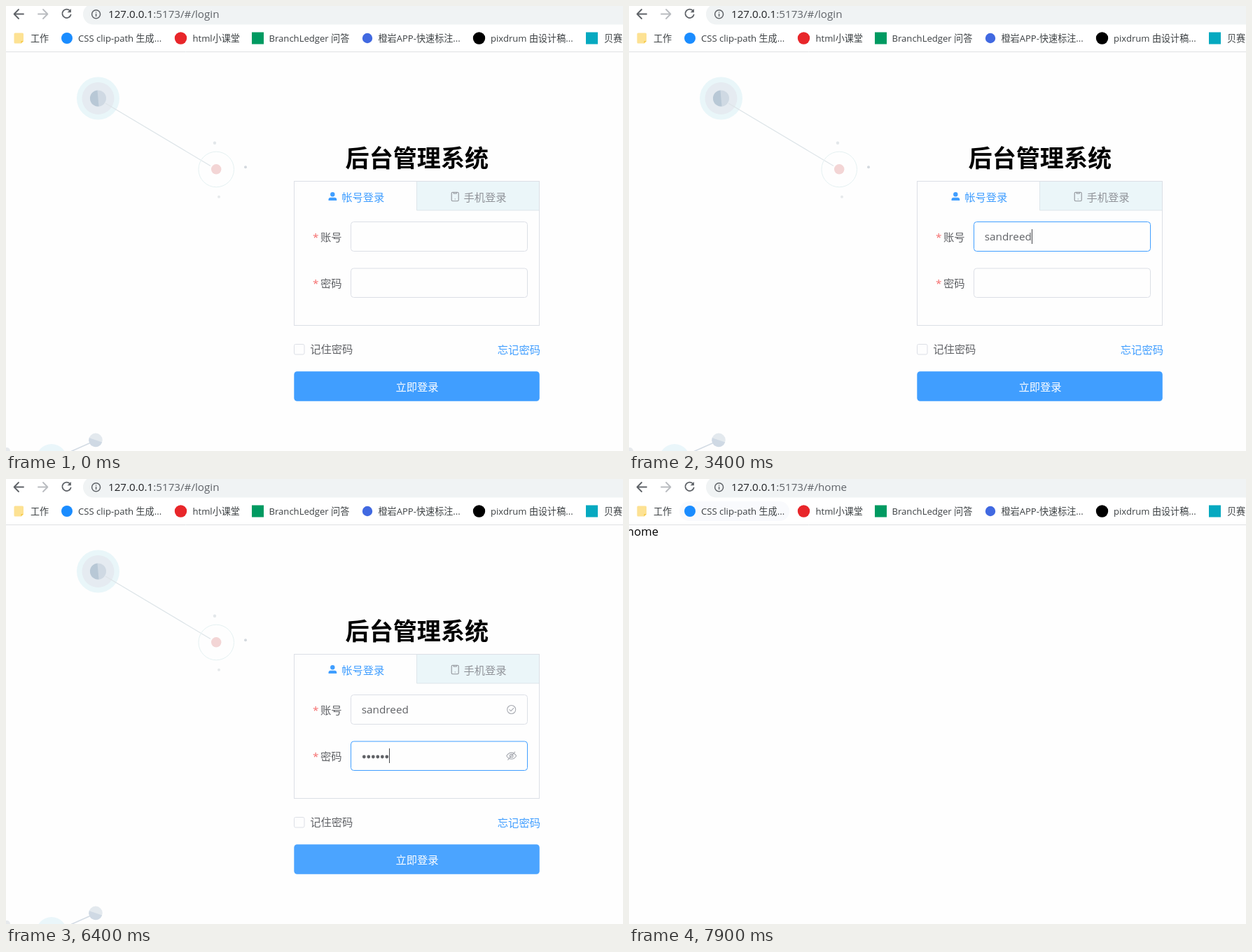
An HTML page for the animation above (8000 ms loop, 881 by 636 pixels).

```html
<!DOCTYPE html>
<html lang="zh-CN">
<head>
<meta charset="utf-8">
<title>后台管理系统</title>
<style>
html, body { margin: 0; width: 100%; height: 100%; overflow: hidden; background: #fff; }
svg { display: block; width: 881px; height: 636px; font: 15.3px "Open Sans", "Noto Sans CJK SC", "Noto Sans CJK", sans-serif; }
.line { fill: none; stroke-linecap: round; stroke-linejoin: round; }
.bookmarks { font-size: 13.1px; fill: #3c4043; }
.url { font-size: 15.2px; fill: #5f6368; }
.url .host { fill: #202124; }
.title { font-size: 34.1px; font-weight: 700; text-anchor: middle; }
.label { fill: #606266; }
.blue { fill: #409eff; }
.grey { fill: #909399; }
.star { fill: #f56c6c; }
.border { fill: none; stroke: #dcdfe6; }
.icon { fill: none; stroke: #a8abb2; stroke-width: 1.1; stroke-linecap: round; stroke-linejoin: round; }

/* One shared 8 s clock; 100 ms = 1.25% */
.login, .home, #accountBox, #passBox, #button, .ok1, .ok2, .eye { animation: 8s step-end infinite; }
.login { animation-name: login; }
.home { animation-name: home; }
#accountBox { animation-name: account; }
#passBox { animation-name: pass; }
#button { fill: #409eff; animation-name: button; }
.ok1 { animation-name: ok1; }
.ok2 { animation-name: ok2; }
.eye { animation-name: eye; }
@keyframes login { 0% { opacity: 1 } 90%, 100% { opacity: 0 } }
@keyframes home { 0% { opacity: 0 } 90%, 100% { opacity: 1 } }
@keyframes account {
  0% { stroke: #dcdfe6 } 6.25% { stroke: #c0c4cc } 8.75% { stroke: #80b1e6 }
  10% { stroke: #409eff } 57.5% { stroke: #8ebff3 } 58.75%, 100% { stroke: #dcdfe6 }
}
@keyframes pass {
  0% { stroke: #dcdfe6 } 3.75% { stroke: #c0c4cc } 6.25% { stroke: #dcdfe6 }
  52.5% { stroke: #c0c4cc } 56.25% { stroke: #b4bccf } 57.5% { stroke: #80b1e6 }
  58.75% { stroke: #409eff } 87.5%, 100% { stroke: #c8d6ea }
}
@keyframes button {
  0% { fill: #409eff } 80% { fill: #4ba4ff } 81.25% { fill: #79bbff }
  86.25% { fill: #4f96e2 } 87.5%, 100% { fill: #79bbff }
}
@keyframes ok1 { 0% { opacity: 0 } 56.25%, 100% { opacity: 1 } }
@keyframes ok2 { 0% { opacity: 0 } 86.25%, 100% { opacity: 1 } }
@keyframes eye {
  0% { opacity: 0; transform: none } 58.75% { opacity: 1; transform: none }
  86.25%, 100% { opacity: 1; transform: translateX(-23px) }
}
</style>
</head>
<body>
<svg viewBox="0 0 881 636">
  <defs>
    <g id="check" class="icon"><circle r="6"/><path d="M-2.8 .2L-.7 2.2L3-1.8"/></g>
  </defs>
  <rect width="881" height="636" fill="#fefefe"/>
  <rect width="881" height="65" fill="#fff"/>

  <!-- Browser bar -->
  <rect x="110" y="-3" width="800" height="29.5" rx="14.7" fill="#f0f3f4"/>
  <g class="line" stroke-width="1.8">
    <path d="M25 11.5H12M18 5L11.6 11.5L18 18" stroke="#5f6368"/>
    <path d="M46 11.5H59M53 5L59.4 11.5L53 18" stroke="#b9bcc0"/>
    <path d="M91.5 7A6.2 6.2 0 1 0 92.6 12.5" stroke="#5f6368"/>
    <circle cx="128.6" cy="11.8" r="6" stroke="#5f6368" stroke-width="1.5"/>
    <path d="M128.6 11.5V14.6M128.6 8.9V9" stroke="#5f6368" stroke-width="1.5"/>
  </g>
  <path d="M92.9 4V9.3H87.6Z" fill="#5f6368"/>
  <text class="url login" x="146" y="17"><tspan class="host">127.0.0.1</tspan>:5173/#/login</text>
  <text class="url home" x="146" y="17"><tspan class="host">127.0.0.1</tspan>:5173/#/home</text>

  <!-- Bookmarks -->
  <rect class="home" x="72" y="32" width="157" height="28" rx="14" fill="#f9fafd"/>
  <path d="M13 38.5H23.5Q25 38.5 25 40V50L21.5 53.5H13Q11.5 53.5 11.5 52V40Q11.5 38.5 13 38.5Z" fill="#fde293"/>
  <path d="M25 50H21.5V53.5Z" fill="#f6c945"/>
  <circle cx="87" cy="46" r="8" fill="#1a8cff"/>
  <circle cx="249.5" cy="46" r="8.7" fill="#e8262a"/>
  <rect x="351" y="37.5" width="17" height="17" fill="#009a61"/>
  <circle cx="516" cy="46" r="7.2" fill="#4169e1"/>
  <circle cx="675.5" cy="46" r="8.7" fill="#000"/>
  <rect x="828" y="37.5" width="17" height="17" fill="#06a9c0"/>
  <g class="bookmarks">
    <text x="35" y="51">工作</text>
    <text x="103" y="51">CSS clip-path 生成...</text>
    <text x="266.5" y="51">html小课堂</text>
    <text x="375.5" y="51">BranchLedger 问答</text>
    <text x="531.5" y="51">橙岩APP-快速标注...</text>
    <text x="692" y="51">pixdrum 由设计稿...</text>
    <text x="854" y="51">贝赛尔曲线</text>
  </g>
  <path d="M0 65.5H881" stroke="#dfe1e3"/>

  <g class="login">
    <!-- Backdrop -->
    <circle cx="131.5" cy="132" r="30.5" fill="#e9f6f9"/>
    <circle cx="131.5" cy="132" r="23" fill="#e5ebf1"/>
    <circle cx="131.5" cy="132" r="11.5" fill="#cfd9e3"/>
    <path d="M130.5 120.5A11.5 11.5 0 0 0 132.5 143.5Z" fill="#b8c8d6"/>
    <path d="M142 139L292 228.5" stroke="#dde4e8" stroke-width="1.2"/>
    <circle cx="300.2" cy="233.5" r="25.3" fill="none" stroke="#e4f0f1"/>
    <circle cx="300.2" cy="233.3" r="7.2" fill="#f3d5d5"/>
    <circle cx="298" cy="195.8" r="2.2" fill="#e3e7ea"/>
    <circle cx="342" cy="230.3" r="2" fill="#d3d9de"/>
    <circle cx="304" cy="272.8" r="2" fill="#e6e9eb"/>
    <circle cx="65" cy="648" r="22" fill="#eaf6fa"/>
    <path d="M93 636.5L120 624.5" stroke="#d3dbe4" stroke-width="1.5"/>
    <circle cx="128" cy="620.3" r="9.7" fill="#e3e9ee"/>
    <path d="M118.8 617.2L137.2 623.6A9.7 9.7 0 0 1 118.8 617.2Z" fill="#cfd9e4"/>
    <circle cx="1" cy="636" r="5" fill="#e6e9ec"/>

    <!-- Form card -->
    <text class="title" x="586.8" y="230">后台管理系统</text>
    <rect x="586" y="250" width="176" height="42" fill="#ebf6f9"/>
    <path d="M586.5 251V292H761.5" fill="none" stroke="#dde5ea"/>
    <rect class="border" x="411.5" y="250.5" width="350" height="206"/>
    <g class="blue">
      <circle cx="466.3" cy="269.2" r="3.2"/>
      <path d="M460.5 278V276.8Q460.5 273.8 463.5 273.8H469.2Q472.2 273.8 472.2 276.8V278Z"/>
      <text x="479.2" y="278.6">帐号登录</text>
    </g>
    <g class="line" stroke="#909399" stroke-width="1.1">
      <rect x="636.2" y="266.2" width="10" height="12.6" rx="1.6"/>
      <path d="M639.2 266.6V268H643.2V266.6M641.2 275.8V276"/>
    </g>
    <text class="grey" x="653.4" y="278.6">手机登录</text>
    <text class="star" x="438" y="335.5">*</text>
    <text class="label" x="449" y="335.6">账号</text>
    <text class="star" x="438" y="401.5">*</text>
    <text class="label" x="449" y="401.6">密码</text>
    <rect id="accountBox" class="border" x="492.5" y="308.5" width="252" height="42" rx="4"/>
    <rect id="passBox" class="border" x="492.5" y="375" width="252" height="41.5" rx="4"/>
    <text id="user" class="label" x="507.8" y="335.3"></text>
    <path id="dots" class="line" stroke="#606266" stroke-width="4.8" stroke-dasharray="0 6.5"/>
    <rect id="caret" width="1" height="21" fill="#44464a"/>
    <g class="ok1"><use href="#check" x="721.7" y="329.5"/></g>
    <g class="ok2"><use href="#check" x="721.7" y="395.5"/></g>
    <g class="eye"><g class="icon" transform="translate(721.7 395.7)">
      <path d="M-7 0Q-4-4.6 0-4.6T7 0Q4 4.6 0 4.6T-7 0Z"/><circle r="2.3"/><path d="M-5 5.6L5-5.6"/>
    </g></g>

    <!-- Below the card -->
    <rect class="border" x="411.5" y="483.5" width="14.5" height="14.5" rx="2"/>
    <text class="label" x="434.2" y="496.4">记住密码</text>
    <text class="blue" x="701.8" y="497">忘记密码</text>
    <rect id="button" x="411.3" y="522.3" width="350.5" height="42.4" rx="4.4"/>
    <text x="587" y="549.6" fill="#fff" text-anchor="middle">立即登录</text>
  </g>
  <text class="home" x="-3" y="81" font-size="16.6">home</text>
</svg>
<script>
const [user, dots, caret] = ['user', 'dots', 'caret'].map(id => document.getElementById(id));
const NAME = 'sandreed', LOOP = 8000, DOT = 6.5;

// time, letters typed, password dots, field holding the caret
const STEPS = [
  [0, 0, 0, ''], [700, 0, 0, 'u'], [1200, 0, 0, ''], [1500, 1, 0, 'u'], [1600, 2, 0, 'u'],
  [2100, 2, 0, ''], [2200, 3, 0, 'u'], [2300, 4, 0, 'u'], [2800, 5, 0, 'u'], [3100, 6, 0, 'u'],
  [3300, 7, 0, 'u'], [3400, 8, 0, 'u'], [4000, 8, 0, ''], [4400, 8, 0, 'p'], [4700, 8, 1, 'p'],
  [4800, 8, 2, 'p'], [5000, 8, 3, 'p'], [5100, 8, 4, 'p'], [5300, 8, 5, 'p'], [5500, 8, 6, 'p'],
  [5900, 8, 6, ''], [6400, 8, 6, 'p'], [6900, 8, 6, '']
];

let start, shown;

function draw(now) {
  start ??= now;
  const t = (now - start) % LOOP;
  const step = STEPS.findLast(s => s[0] <= t + 0.5);
  if (step !== shown) {
    shown = step;
    const [, letters, count, field] = step;
    user.textContent = NAME.slice(0, letters);
    dots.setAttribute('d', count ? `M511.3 397h${DOT * (count - 1) + 0.1}` : '');
    const width = field === 'p' ? count * DOT : letters ? user.getComputedTextLength() : 0;
    caret.setAttribute('x', Math.round(508 + width));
    caret.setAttribute('y', field === 'p' ? 385 : 319);
    caret.setAttribute('visibility', field ? 'visible' : 'hidden');
  }
  requestAnimationFrame(draw);
}
requestAnimationFrame(draw);
</script>
</body>
</html>
```
